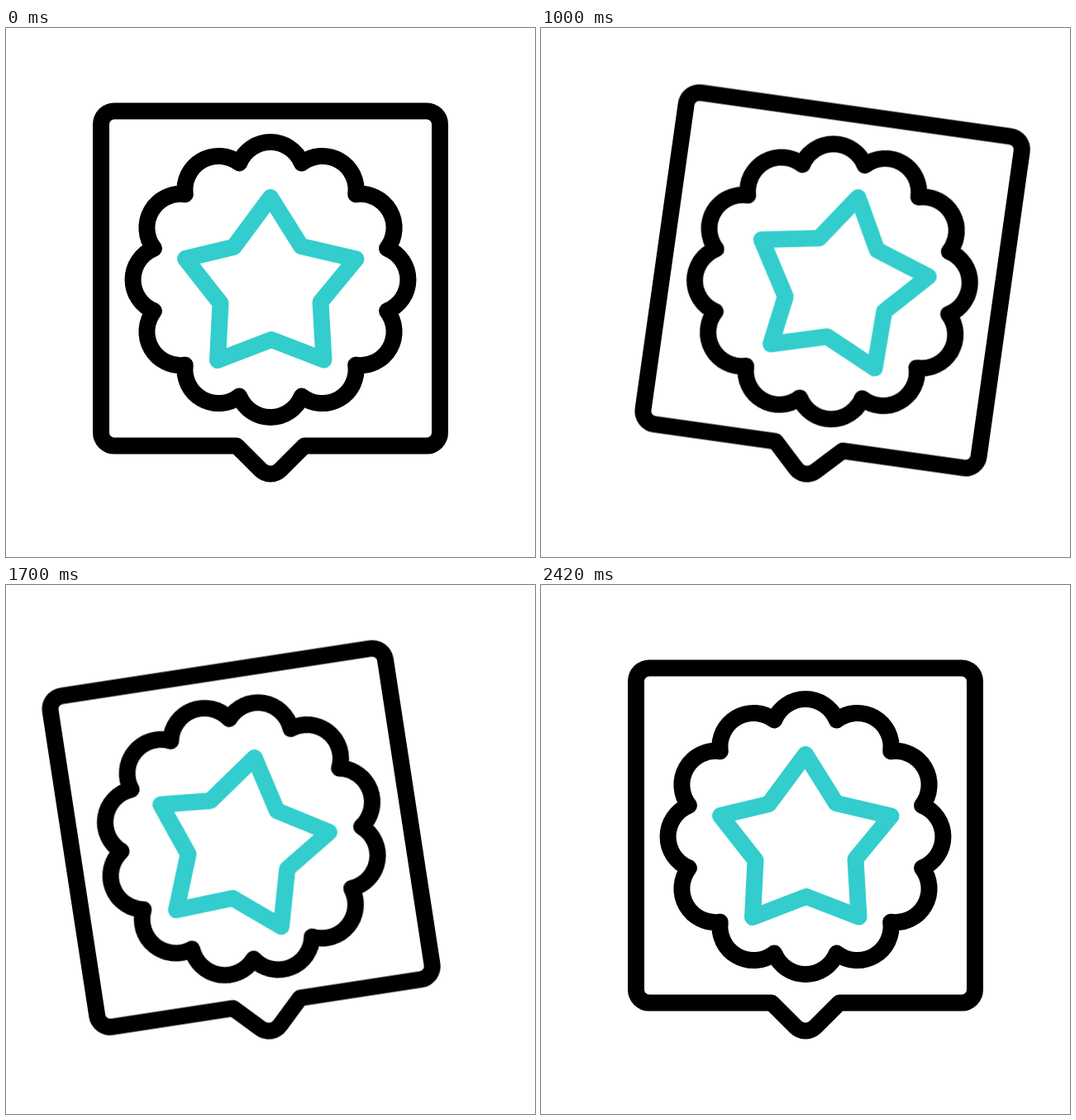
Animation, 640 px wide and 640 px high, one loop 3600 ms. Source, as an HTML page:

```html
<!DOCTYPE html>
<html lang="en">
<head>
<meta charset="utf-8">
<title>Star badge</title>
<style>
  html, body { margin: 0; width: 100%; height: 100%; overflow: hidden; background: #fff; }
  svg { display: block; width: 100%; height: 100%; }
  path, polygon { fill: none; stroke: #000; stroke-width: 20; stroke-linejoin: round; }
  polygon { stroke: #33cdcd; }

  .hop, .tilt, .spin {
    animation: 3600ms infinite;
    animation-timing-function: cubic-bezier(.333, 0, .667, 1);
  }
  .hop { animation-name: hop; }
  .tilt { animation-name: tilt; transform-origin: 320px 536.5px; }
  .spin { animation-name: spin; transform-origin: 320px 304.5px; }

  @keyframes hop {
    0% { transform: translate(0, 0); }
    15.556%, 17.222% { transform: translate(-10.4px, -55.2px); }
    27.222%, 100% { transform: translate(0, 0); }
  }
  @keyframes tilt {
    0% { transform: rotate(0deg); }
    14.861% { transform: rotate(-10.7deg); animation-timing-function: cubic-bezier(.33, 0, .59, 1); }
    34.583% { transform: rotate(13.55deg); }
    46.444% { transform: rotate(-8.95deg); }
    58.611% { transform: rotate(9deg); }
    67.222%, 100% { transform: rotate(0deg); }
  }
  @keyframes spin {
    0% { transform: rotate(0deg); }
    16.6% { transform: rotate(12.4deg); animation-timing-function: cubic-bezier(.345, 0, .65, 1); }
    55.139% { transform: rotate(-383deg); }
    67.222%, 100% { transform: rotate(-360deg); }
  }
</style>
</head>
<body>
<svg viewBox="0 0 640 640">
  <g class="hop">
    <g class="tilt">
      <path d="M131 100.5H509A16 16 0 0 1 525 116.5V489.5A16 16 0 0 1 509 505.5H361L331.95 534.55A16.9 16.9 0 0 1 308.05 534.55L279 505.5H131A16 16 0 0 1 115 489.5V116.5A16 16 0 0 1 131 100.5Z"/>
      <g class="spin">
        <path id="badge"/>
        <polygon points="320,205 357,264 423.5,279.5 380.5,331.5 384.5,401.5 321,377 256,402 259.5,333 217,279 275.5,265"/>
      </g>
    </g>
  </g>
</svg>
<script>
  // Twelve arcs between valley points on a circle
  const lobes = 12, valley = 146, bump = 40.8;
  const point = i => {
    const a = (i - 0.5) * 2 * Math.PI / lobes;
    return (320 + valley * Math.sin(a)).toFixed(2) + ' ' + (304.5 - valley * Math.cos(a)).toFixed(2);
  };
  let d = 'M' + point(0);
  for (let i = 1; i <= lobes; i++) d += `A${bump} ${bump} 0 0 1 ${point(i)}`;
  document.getElementById('badge').setAttribute('d', d + 'Z');
</script>
</body>
</html>
```
